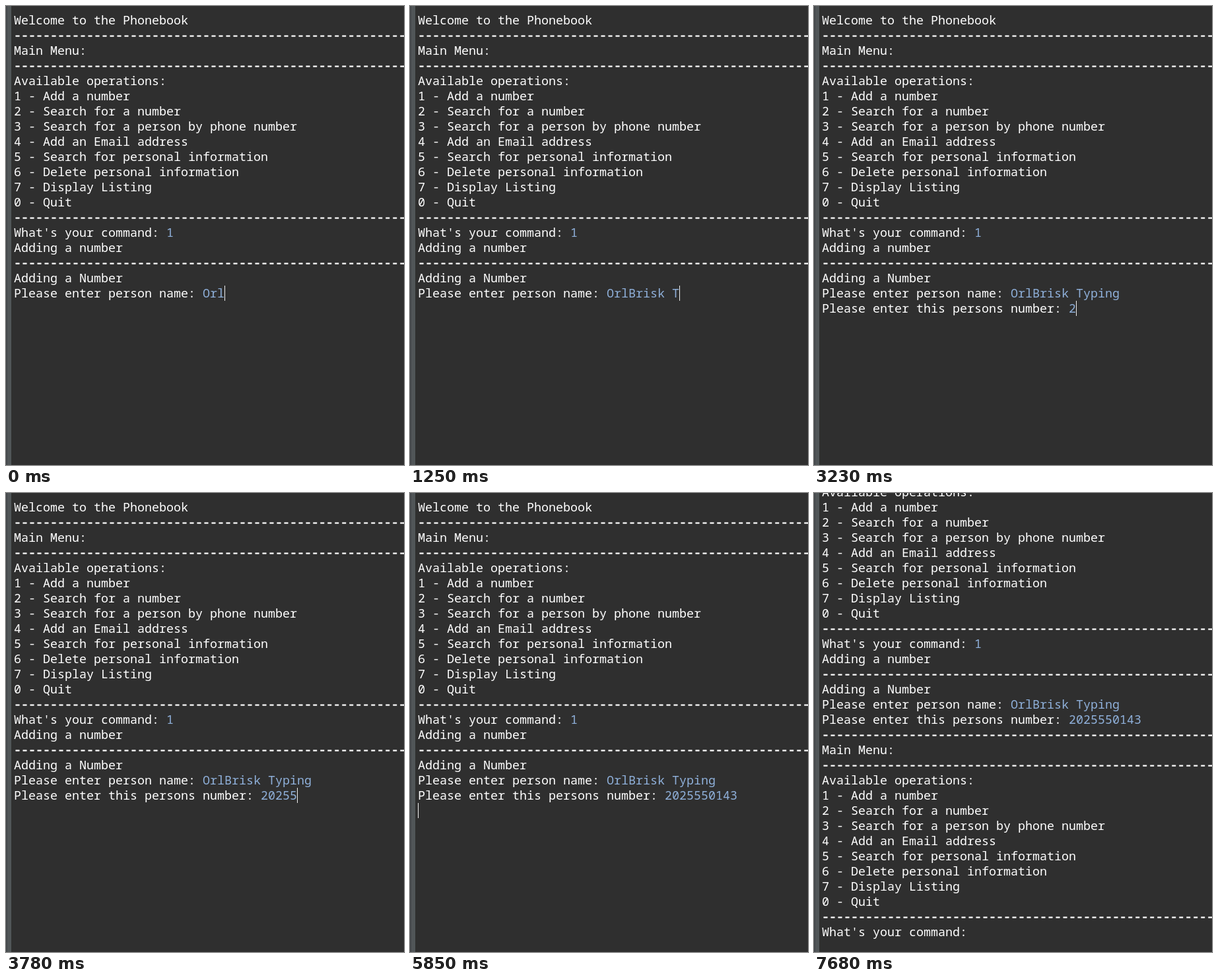
An HTML page for the animation above (8 s loop, 603 by 696 pixels).

```html
<!DOCTYPE html>
<html lang="en">
<head>
<meta charset="utf-8">
<title>Phonebook console</title>
<style>
  html, body { margin: 0; width: 100%; height: 100%; overflow: hidden; background: #2f2f2f; }
  #stage { position: relative; width: 603px; height: 696px; overflow: hidden; }
  #ruler {
    position: absolute; left: 0; width: 6px; height: 100%;
    background: #515658; border-left: 2px solid #43474a;
  }
  #view { position: absolute; left: 12px; top: 0; }
  pre {
    position: absolute; left: 0; top: 9px; margin: 0; color: #fff;
    font: 18.333px/23px "Noto Sans Mono", "DejaVu Sans Mono", monospace;
    font-variant-ligatures: none;
  }
  b { font-weight: normal; color: #8fb0da; }
  i { font-style: normal; -webkit-text-stroke: 0.5px #fff; }
  #caret { position: absolute; width: 1px; height: 23px; background: #f0f0f0; }
</style>
</head>
<body>
<div id="stage">
  <div id="ruler"></div>
  <div id="view"><pre id="text"></pre><div id="caret"></div></div>
</div>
<script>
const LOOP = 8000, BLINK = 560, COL = 11, ROW = 23, TOP = 10;
const NAME = "OrlBrisk Typing", PHONE = "2025550143";
const NAME_ASK = "Please enter person name: ";
const PHONE_ASK = "Please enter this persons number: ";
const RULE = `<i>${"-".repeat(60)}</i>`;
const OPERATIONS = ["Add a number", "Search for a number", "Search for a person by phone number",
  "Add an Email address", "Search for personal information", "Delete personal information",
  "Display Listing", "Quit"];
const MENU = `${RULE}
Main Menu:
${RULE}
Available operations:
${OPERATIONS.map((label, i) => `${(i + 1) % OPERATIONS.length} - ${label}`).join("\n")}
${RULE}
What's your command: `;
const INTRO = `Welcome to the Phonebook
${MENU}<b>1</b>
Adding a number
${RULE}
Adding a Number
`;

// Typing pace: [time, characters], even speed between the points
const namePace = [[0, 3], [300, 4], [690, 8], [1250, 10], [1650, 15]];
const phonePace = [[0, 0], [3230, 1], [3510, 4], [4735, 9], [5540, 10]];
const NAME_DONE = 2080, PHONE_DONE = 5850, MENU_SHOWN = 5970;

const [view, text, caret] = ["view", "text", "caret"].map(id => document.getElementById(id));
let shown = "";

function interpolate(points, x) {
  const next = points.findIndex(p => p[0] > x);
  if (next < 0) return points.at(-1)[1];
  const [[x0, y0], [x1, y1]] = points.slice(next - 1, next + 1);
  return y0 + (y1 - y0) * (x - x0) / (x1 - x0);
}
const typed = (word, pace, t) => word.slice(0, Math.floor(interpolate(pace, t)));
const keyTime = (word, pace) => interpolate(pace.map(([t, n]) => [n, t]), word.length);

function draw(t) {
  const name = typed(NAME, namePace, t), phone = typed(PHONE, phonePace, t);
  let out = `${INTRO}${NAME_ASK}<b>${name}</b>\n`;
  let row = 18, col = NAME_ASK.length + name.length;
  if (t >= NAME_DONE) {
    out += `${PHONE_ASK}<b>${phone}</b>\n`;
    row = 19;
    col = phone ? PHONE_ASK.length + phone.length : 0;
  }
  if (t >= PHONE_DONE) [row, col] = [20, 0];
  if (t >= MENU_SHOWN) out += MENU;
  if (out !== shown) text.innerHTML = shown = out;

  // The caret starts a new blink after every key or new line
  const lines = [NAME_DONE, PHONE_DONE, MENU_SHOWN].filter(time => time <= t);
  const last = Math.max(keyTime(name, namePace), keyTime(phone, phonePace), ...lines);
  caret.hidden = Math.trunc((t - last) / BLINK) % 2 === 1;
  caret.style.left = col * COL + "px";
  caret.style.top = TOP + row * ROW + "px";
  view.style.top = (t >= MENU_SHOWN ? -5 * ROW : 0) + "px";
}

const start = performance.now();
function tick() {
  draw((performance.now() - start) % LOOP);
  requestAnimationFrame(tick);
}
tick();
</script>
</body>
</html>
```
